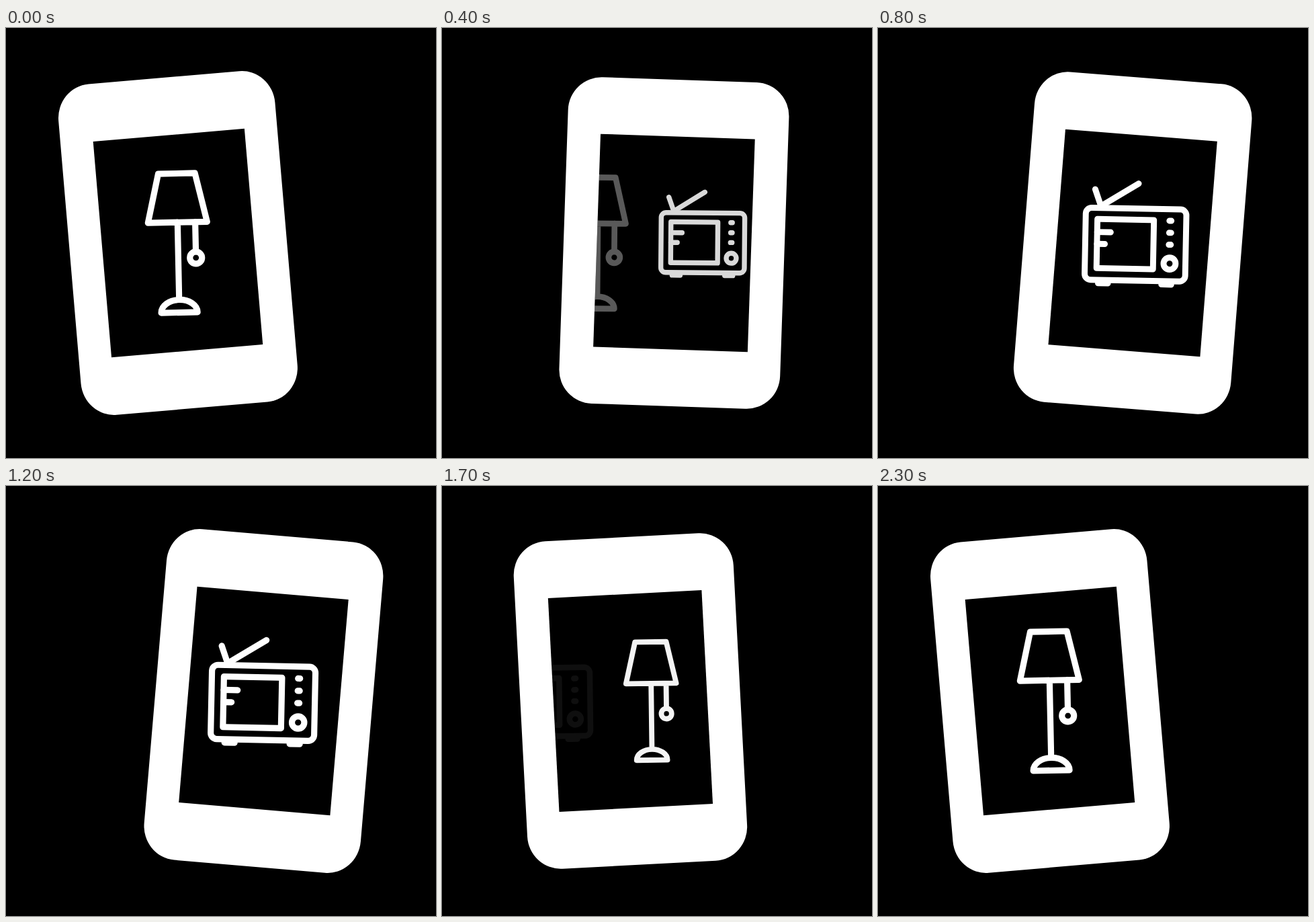
Animation of 640x640 px, one loop 2400 ms. Source, as an HTML page:

```html
<!DOCTYPE html>
<html lang="en">
<head>
<meta charset="utf-8">
<title>Swiping phone</title>
<style>
  html, body { margin: 0; height: 100%; overflow: hidden; background: #000; }
  svg { display: block; width: 100vw; height: 100vh; }
  .icon { fill: none; stroke: #fff; stroke-width: 9.2; stroke-linecap: round; stroke-linejoin: round; }
</style>
</head>
<body>
<svg viewBox="0 0 640 640">
  <clipPath id="screen">
    <rect class="phone" x="-115.3" y="-158" width="230.6" height="316"/>
  </clipPath>
  <g class="phone">
    <rect x="-165" y="-242.2" width="330" height="484.4" rx="50" fill="#fff"/>
    <rect x="-115.3" y="-158" width="230.6" height="316"/>
  </g>
  <g clip-path="url(#screen)">
    <g id="lamp" class="icon">
      <path d="M-27.3-103.5H27.3L44-30.8H-44ZM0-30.8V84M26.3-30.8V13.5M-27 103.5A27 19 0 0 1 27 103.5Z"/>
      <circle cx="26.3" cy="22.5" r="9"/>
    </g>
    <g id="tv" class="icon">
      <g transform="translate(0 13.5)">
        <rect x="-77.5" y="-52.3" width="154" height="110.3" rx="9"/>
        <rect x="-59.5" y="-35.2" width="86.5" height="75.2"/>
        <path d="M-59.5-15.3h20.7M-59.5 2.8h12M50.8-34.6h3M50.7-16.2h3M50.5 2h3M-56.7 63h15M40.3 63h15M-63.7-80.7L-54.5-55L2.6-90.6"/>
        <circle cx="52.2" cy="30.9" r="9.2"/>
      </g>
    </g>
  </g>
</svg>
<script>
const HALF = 1200, MOVE = 1075, STEP = 100;
const icons = {
  lamp: { el: document.getElementById('lamp'), y: 320, reach: 162, shrink: 0.68 },
  tv: { el: document.getElementById('tv'), y: 306.5, reach: 145, shrink: 0.6 }
};
const phones = document.querySelectorAll('.phone');

// Cubic bezier easing (.232, 0, .1225, 1), solved by bisection
function ease(u) {
  if (u >= 1) return 1;
  let lo = 0, hi = 1, s;
  for (let i = 0; i < 24; i++) {
    s = (lo + hi) / 2;
    const r = 1 - s, x = 3 * r * r * s * 0.232 + 3 * r * s * s * 0.1225 + s ** 3;
    if (x < u) lo = s; else hi = s;
  }
  return smooth(s);
}

function smooth(x) {
  x = Math.min(1, x);
  return x * x * (3 - 2 * x);
}

function fadeOut(t) {
  if (t < 400) return 1 - t * 0.65 / 400;
  return Math.max(0, 0.35 - (t - 400) * 0.0029);
}

function place(icon, x, tilt, scale, opacity) {
  icon.el.setAttribute('transform', `translate(${x} ${icon.y}) rotate(${1.2 * tilt}) scale(${scale})`);
  icon.el.setAttribute('opacity', opacity);
}

function draw(now) {
  const time = Math.floor(now / STEP) * STEP % (2 * HALF);
  const t = time % HALF, forward = time < HALF;
  const p = ease(t / MOVE);
  const tilt = (forward ? 1 : -1) * (2 * p - 1);
  const x = 319.7 + 63.75 * tilt, bend = 0.02 * tilt * tilt;
  for (const el of phones) {
    el.setAttribute('transform',
      `translate(${x} 320) rotate(${4.87 * tilt}) scale(${1 - bend} ${1 + bend})`);
  }
  const [leaving, entering] = forward ? [icons.lamp, icons.tv] : [icons.tv, icons.lamp];
  place(leaving, x - 162 * p, tilt, 1 - 0.115 * p * p, fadeOut(t));
  place(entering, x + entering.reach * (1 - p), tilt,
    1 - entering.shrink * (1 - t / HALF) ** 2.8, smooth(1.08 * p));
}

function loop() {
  draw(performance.now());
  requestAnimationFrame(loop);
}
loop();
</script>
</body>
</html>
```
